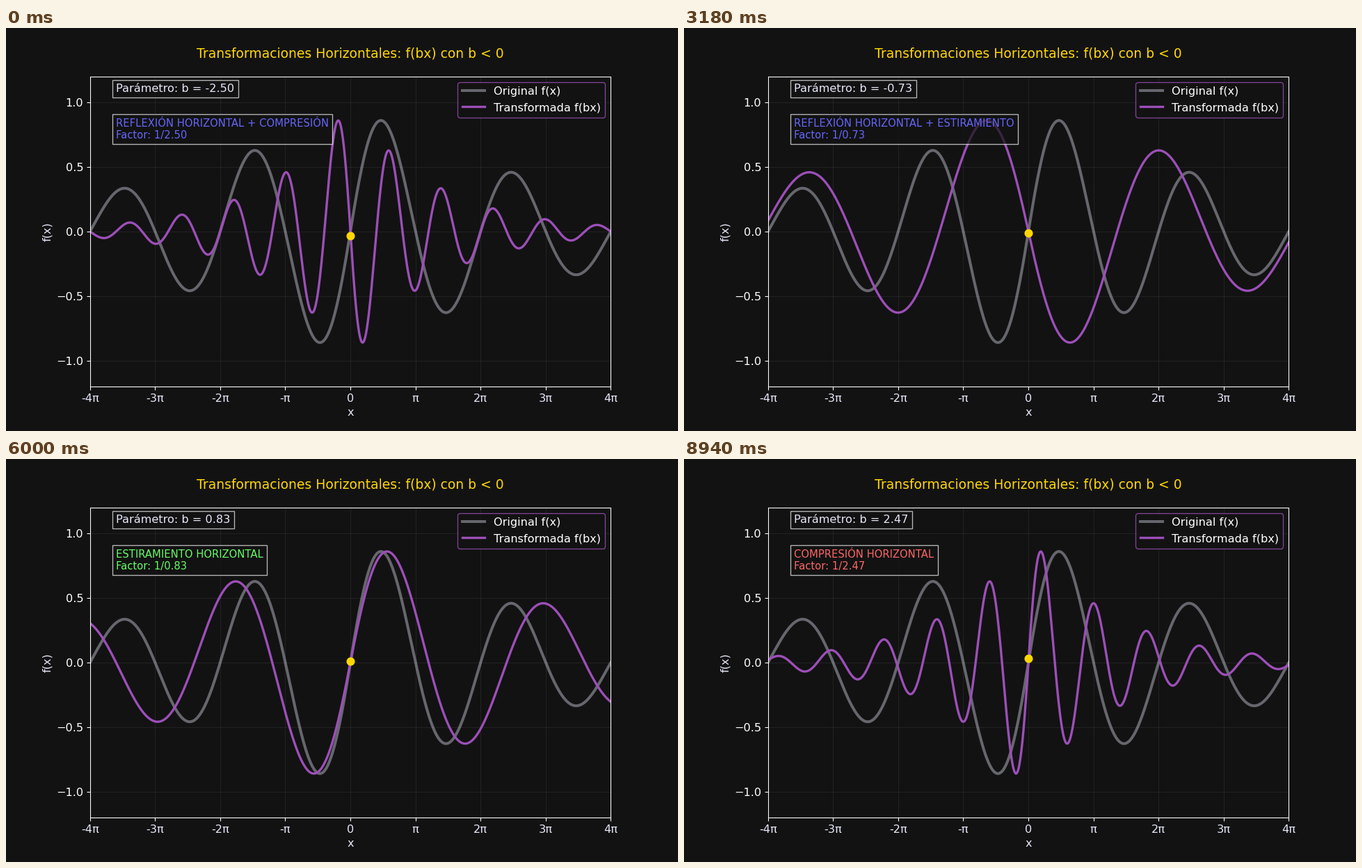
Recreate the animation shown at these times as a matplotlib script. Size 966 by 580 pixels, loop 9 s.

```python
import numpy as np
import matplotlib.pyplot as plt
from matplotlib.animation import FuncAnimation

W, H, DPI = 966, 580, 96.6
FRAMES, STEP = 150, 60
BG, LAVENDER, PURPLE, GOLD = "#121212", "#E6E6FA", "#9C4FB8", "#FFD700"
BLUE, GREEN, RED = "#6666FF", "#66FF66", "#FF6666"

plt.rcParams["font.family"] = "DejaVu Sans"
plt.rcParams["font.size"] = 12


def f(x):
    return np.sin(x) * np.exp(-0.1 * np.abs(x))


def describe(b):
    kind = "COMPRESIÓN" if abs(b) > 1 else "ESTIRAMIENTO"
    factor = f"\nFactor: 1/{abs(b):.2f}"
    if b < 0:
        return f"REFLEXIÓN HORIZONTAL + {kind}{factor}", BLUE
    return f"{kind} HORIZONTAL{factor}", RED if b > 1 else GREEN


def pi_label(n):
    if n == 0:
        return "0"
    sign = "-" if n < 0 else ""
    return f"{sign}{abs(n) if abs(n) > 1 else ''}π"


# The tiny margin keeps the pixel size from rounding down.
fig = plt.figure(figsize=((W + 0.01) / DPI, (H + 0.01) / DPI), dpi=DPI,
                 facecolor=BG)
ax = fig.add_axes([0.125, 0.11, 0.775, 0.77], facecolor=BG)
ax.set_xlim(-4 * np.pi, 4 * np.pi)
ax.set_ylim(-1.2, 1.2)
ax.set_title("Transformaciones Horizontales: f(bx) con b < 0",
             color=GOLD, fontsize=14, pad=20)
ax.set_xlabel("x", color=LAVENDER)
ax.set_ylabel("f(x)", color=LAVENDER)
ax.tick_params(colors="white")
ax.set_xticks([n * np.pi for n in range(-4, 5)],
              [pi_label(n) for n in range(-4, 5)], color=LAVENDER)
ax.set_yticks([-1, -0.5, 0, 0.5, 1])
ax.grid(color="white", alpha=0.07, linewidth=0.8)
for spine in ax.spines.values():
    spine.set_color("white")

x = np.linspace(-4 * np.pi, 4 * np.pi, 1000)
mid = len(x) // 2
ax.plot(x, f(x), color=LAVENDER, alpha=0.4, lw=3, label="Original f(x)")
curve, = ax.plot(x, f(x), color=PURPLE, lw=2.5, label="Transformada f(bx)")
dot, = ax.plot([x[mid]], [0], "o", color=GOLD, ms=8, zorder=5)
ax.legend(loc="upper right", fontsize=12, facecolor=BG, edgecolor=PURPLE,
          labelcolor="white")

box = dict(facecolor=BG, edgecolor="white", alpha=0.7)
param = ax.text(0.05, 0.95, "", transform=ax.transAxes, color=LAVENDER,
                fontsize=12, bbox=box)
info = ax.text(0.05, 0.8, "", transform=ax.transAxes, fontsize=11, bbox=box)


def update(i):
    b = -2.5 + 5 * i / FRAMES
    y = f(b * x)
    curve.set_ydata(y)
    dot.set_ydata([y[mid]])
    param.set_text(f"Parámetro: b = {b:.2f}")
    text, color = describe(b)
    info.set_text(text)
    info.set_color(color)
    return curve, dot, param, info


anim = FuncAnimation(fig, update, frames=FRAMES, interval=STEP,
                     init_func=lambda: update(0), repeat=True, repeat_delay=0)
plt.show()
```
